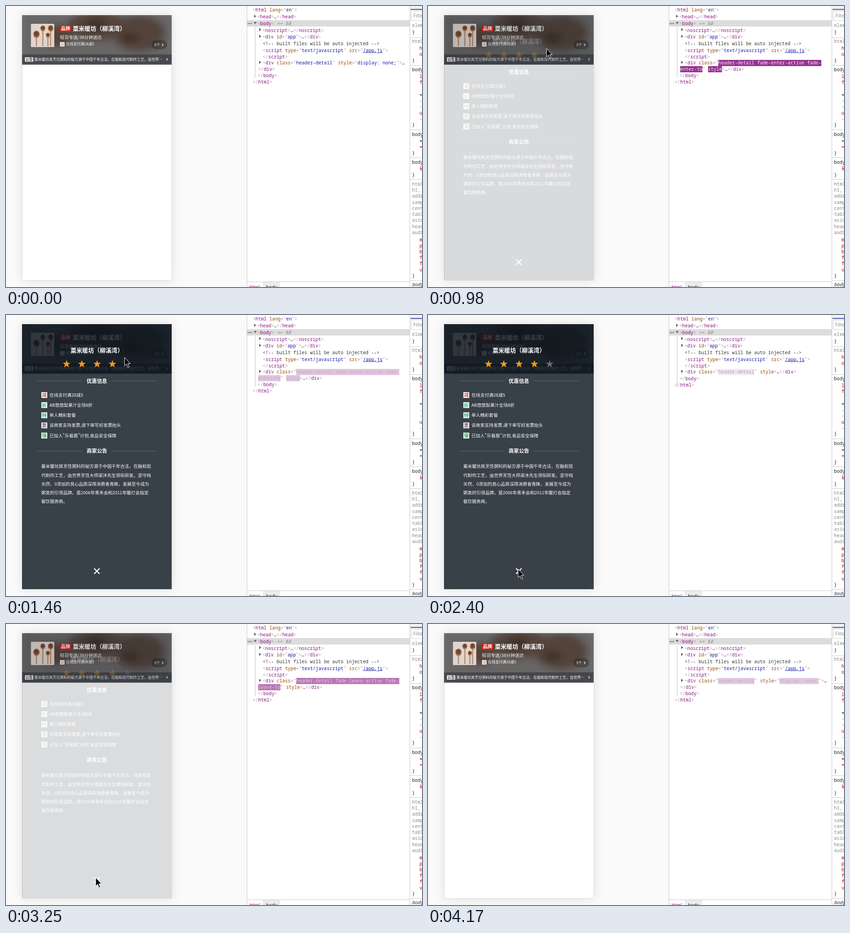
An HTML page for the animation above (4.4 s loop, 909 by 616 pixels).

```html
<!DOCTYPE html>
<html lang="zh-CN">
<head>
<meta charset="utf-8">
<title>Header detail fade</title>
<style>
  html, body { margin: 0; width: 100%; height: 100%; overflow: hidden; background: #fff; }
  svg { display: block; }
  text { white-space: pre; font-family: "Noto Sans CJK SC", "Noto Sans CJK", "Noto Sans", sans-serif; }
  .app text { fill: #fff; font-weight: 500; }
  .app .b { font-weight: 700; }
  .code text { font: 10.15px "Noto Sans Mono", "DejaVu Sans Mono", monospace; }
  .ui text { font: 10.5px "Open Sans", "Noto Sans", sans-serif; }
  .p { fill: #a894a6; }
  .n { fill: #881280; }
  .a { fill: #994500; }
  .v { fill: #1a1aa6; }
  .l { fill: #1a1aa6; text-decoration: underline; }
  .c { fill: #303a30; }
  .g { fill: #888; }
  .r { fill: #c80000; }
  .k { fill: #222; }
  .i { fill: #888; font-style: italic !important; }
  .o { fill: #222; font-style: italic !important; }
  rect.h { fill: var(--bg); }
  text.h { fill: var(--fg); }
</style>
</head>
<body>
<svg width="909" height="616" viewBox="0 0 909 616">
  <defs>
    <filter id="soft" x="-10%" y="-30%" width="120%" height="160%"><feGaussianBlur stdDeviation="8"/></filter>
    <filter id="glow" x="-20%" y="-20%" width="140%" height="140%"><feGaussianBlur stdDeviation="12"/></filter>
    <clipPath id="head"><rect x="35" y="20" width="327" height="108.500"/></clipPath>
  </defs>

  <rect width="526" height="616" fill="#fafafa"/>
  <rect x="35" y="20" width="328" height="582" fill="#000" opacity=".1" filter="url(#glow)"/>
  <rect x="35.500" y="20.500" width="327" height="581" fill="#fff" stroke="#dcdcdc"/>

  <g class="app">
    <g clip-path="url(#head)">
      <rect x="35" y="20" width="327" height="109" fill="#fff"/>
      <g filter="url(#soft)">
        <rect x="30" y="15" width="337" height="119" fill="#cbbcb2"/>
        <g fill="#a1775c">
          <ellipse cx="110" cy="66" rx="34" ry="24"/>
          <ellipse cx="200" cy="44" rx="66" ry="32"/>
          <ellipse cx="290" cy="60" rx="58" ry="40"/>
        </g>
        <g fill="#7c5238">
          <ellipse cx="196" cy="42" rx="24" ry="14"/>
          <ellipse cx="272" cy="70" rx="20" ry="12"/>
        </g>
      </g>
      <rect x="35" y="20" width="327" height="109" fill="#07111b" opacity=".5"/>
      <rect x="35" y="106" width="327" height="23" fill="#07111b" opacity=".35"/>
    </g>
    <g transform="translate(54.500 39)">
      <rect width="51" height="51" rx="1.600" fill="#dfd5ce"/>
      <g id="spoons"></g>
    </g>
    <rect x="118" y="42" width="24" height="15" rx="1.500" fill="#cf2318"/>
    <rect x="118" y="79" width="10" height="10" rx="1" fill="#f3eeec"/>
    <rect x="318" y="75" width="34" height="20" rx="10" fill="#000" opacity=".25"/>
    <rect x="41.500" y="112.500" width="18" height="9.500" rx="1" fill="#fff"/>
    <g fill="none" stroke="#fff" stroke-width="1.100">
      <path d="M341 82.500l2.500 2.500-2.500 2.500M350.500 114.500l2.500 2.500-2.500 2.500"/>
    </g>
    <g id="header"></g>

    <g id="detail" opacity="0">
      <rect x="35" y="20" width="327" height="581" fill="#07111b" opacity=".8"/>
      <path d="M68 144.500H167M230 144.500H330M68 298.500H167M230 298.500H330" stroke="#fff" stroke-opacity=".2"/>
      <g id="stars"></g>
      <g id="info"></g>
      <path d="M192.500 555.500l12 12m0-12l-12 12" stroke="#fff" stroke-width="2.400"/>
    </g>
  </g>

  <g class="code">
    <rect x="526" width="383" height="616" fill="#fff"/>
    <rect x="526" y="31" width="356" height="14" fill="#dcdcdc"/>
    <path d="M544.500 46V158" stroke="#b9c3e6"/>
    <g id="tree"></g>
    <g id="live"></g>
    <g fill="#6e6e6e">
      <path d="M542 19l5 3.500-5 3.500zM541 35h7l-3.500 5zM553 48l5 3.500-5 3.500zM553 63l5 3.500-5 3.500zM553 120l5 3.500-5 3.500z"/>
      <circle cx="529.500" cy="38.500" r="1.300"/><circle cx="533" cy="38.500" r="1.300"/><circle cx="536.500" cy="38.500" r="1.300"/>
    </g>
    <g id="styles"></g>
  </g>

  <g class="ui">
    <rect x="526" y="604" width="356" height="12" fill="#fff"/>
    <rect x="561" y="605" width="38" height="11" fill="#ececec"/>
    <path d="M526 604.500H882" stroke="#ccc"/>
    <text class="n" x="532" y="620">html</text>
    <text class="k" x="568" y="620">body</text>
    <rect x="883" width="26" height="33" fill="#f3f3f3"/>
    <rect x="884" y="6.500" width="25" height="2" fill="#3f51b5"/>
    <path d="M909 11.500H886.500V31.500H909" fill="#fff" stroke="#ddd"/>
    <text class="g" x="890" y="25">Filter</text>
    <path d="M526.500 0V616M882.500 0V616" stroke="#c8c8c8"/>
  </g>

  <path id="cursor" d="M0 0V18.500L4.200 14.600 7.200 22 10 20.700 7 13.600H12.500Z" stroke="#fff" stroke-width="1"/>
</svg>

<script>
const LOOP = 4400, STEP = 78.1, FIRST = 120;
const CW = 6.09;                               // code character width
const $ = id => document.getElementById(id);
const esc = s => s.replace(/&/g, '&amp;').replace(/</g, '&lt;');

const label = (x, y, size, str, extra = '') =>
  `<text x="${x}" y="${y}" font-size="${size}" ${extra}>${esc(str)}</text>`;

// Runs are split by "~"; the first letter of each run is its class.
function line(x, y, src) {
  let out = '', col = 0;
  for (const run of src.split('~')) {
    const cls = run[0], str = run.slice(1), px = x + col * CW;
    if (cls === 'h') out += `<rect class="h" x="${px}" y="${y - 10}" width="${str.length * CW}" height="13.500"/>`;
    out += `<text class="${cls}" x="${px}" y="${y}">${esc(str)}</text>`;
    col += str.length;
  }
  return out;
}

// Phone page
const SHOP = '粟米暖坊（柳溪湾）';
const NOTICE = [
  '粟米暖坊其烹饪粥料的秘方源于中国千年古法，在融和现',
  '代制作工艺，由世界烹饪大师梁沐先生领衔研发。坚守纯',
  '天然、0添加的良心品质深得消费者青睐，发展至今成为',
  '粥类的引领品牌。是2006年青禾会和2011年暖灯会指定',
  '餐饮服务商。'
];
const OFFERS = [
  ['减', '#c4574a', '在线支付满28减5'],
  ['折', '#35a886', 'AB悠悠梨果汁全场8折'],
  ['特', '#27ae60', '单人精彩套餐'],
  ['票', '#6d5578', '该商家支持发票,请下单写好发票抬头'],
  ['保', '#1fae4c', '已加入"乐餐盾"计划,食品安全保障']
];

$('spoons').innerHTML = [[12, 23, 7], [26, 10, 5.5], [43, 10, 6], [37, 25, 4.5]].map(([x, y, r]) =>
  `<rect x="${x - 1.3}" y="${y}" width="2.600" height="${49 - y}" fill="#b98d6c"/>
   <ellipse cx="${x}" cy="${y}" rx="${r}" ry="${r * 1.15}" fill="#a9754f"/>
   <ellipse cx="${x}" cy="${y - 1}" rx="${r * .75}" ry="${r * .8}" fill="#6f4630"/>`).join('');

$('header').innerHTML =
  label(120, 53.2, 10, '品牌', 'class="b"') +
  label(146, 54.2, 12.8, SHOP, 'class="b"') +
  label(118, 71.6, 9.6, '轻羽专送/38分钟送达') +
  label(119, 87, 8, '减', 'style="fill:#c98a80"') +
  label(131, 86, 8, OFFERS[0][2]) +
  label(324, 88, 8, '5个') +
  label(42.7, 120.2, 7.8, '公告', 'class="b" style="fill:#333"') +
  label(62, 120, 8, NOTICE[0] + NOTICE[1].slice(0, 9) + '…');

function star(cx, cy, r) {
  const pts = Array.from({ length: 10 }, (_, i) => {
    const a = i * Math.PI / 5, q = i % 2 ? r * .42 : r;
    return (cx + q * Math.sin(a)).toFixed(1) + ',' + (cy - q * Math.cos(a)).toFixed(1);
  });
  return `<polygon points="${pts.join(' ')}"/>`;
}
$('stars').innerHTML =
  `<g fill="#ff9a0c">${[0, 1, 2, 3].map(i => star(132.3 + 33.4 * i, 107.7, 8.6)).join('')}</g>
   <g id="last" fill="#666d73">${star(265.9, 107.7, 8.6)}</g>`;

$('info').innerHTML =
  label(141, 81.6, 12.8, SHOP, 'class="b"') +
  label(176.3, 148.6, 11.2, '优惠信息', 'class="b"') +
  label(176.3, 302.4, 11.2, '商家公告', 'class="b"') +
  OFFERS.map(([mark, color, str], i) => {
    const y = 175.4 + 22.2 * i;
    return `<rect x="77.300" y="${y - 6.4}" width="12.800" height="12.800" fill="#fff"/>` +
      label(78.5, y + 3.9, 10.4, mark, `class="b" style="fill:${color}"`) +
      label(95, y + 3.4, 9.6, str);
  }).join('') +
  NOTICE.map((str, i) => label(77, 335.4 + 19.2 * i, 9.6, str)).join('');

// Element tree
$('tree').innerHTML =
  line(539, 12.3, 'p<~nhtml~p ~alang~p="~ven~p">') +
  line(549, 26.5, 'p<~nhead~p>~k…~p</~nhead~p>') +
  line(549.5, 41.5, 'p<~nbody~p>~i == $0') +
  line(560.5, 56.5, 'p<~nnoscript~p>~k…~p</~nnoscript~p>') +
  line(560.5, 71, 'p<~ndiv~p ~aid~p="~vapp~p">~k…~p</~ndiv~p>') +
  line(561, 86, 'c<!-- built files will be auto injected -->') +
  line(561, 100.5, 'p<~nscript~p ~atype~p="~vtext/javascript~p" ~asrc~p="~l/app.js~p">') +
  line(561, 114.5, 'p</~nscript~p>');

const OPEN = 'p<~ndiv~p ~aclass~p="~', END = 'p>~k…~p</~ndiv~p>';
const TREES = {
  hidden: [OPEN + 'hheader-detail~p" ~astyle~p="~hdisplay: none;~p">~k…', 'p</~ndiv~p>'],
  enter: [OPEN + 'hheader-detail fade-enter-active fade-', 'henter-to~p" ~hstyle~' + END],
  shown: [OPEN + 'hheader-detail~p" ~astyle~' + END],
  leave: [OPEN + 'hheader-detail fade-leave-active fade-', 'hleave-to~p" ~astyle~' + END]
};

function tree(name, lit) {
  const [first, second] = TREES[name].map(s => lit ? s : s.replace(/~h/g, '~v'));
  const y = second ? 155.8 : 142.8;
  return line(561, 128.2, first) + (second ? line(551, 141.8, second) : '') +
    line(550, y, 'p</~nbody~p>') + line(539, y + 14.6, 'p</~nhtml~p>');
}

// Styles column: class, first y, row height, rows
const BLOCKS = [
  ['g', 42, 14, 'element'], ['k', 57, 14, '}'], ['g', 77, 14, 'html'], ['r', 92, 13.5, ' h, o'],
  ['k', 119, 14, '}'], ['k', 139, 14, 'body'], ['r', 154, 13.3, ' l, f'], ['k', 194, 13, ' -'],
  ['g', 207, 13, ' -, -'], ['r', 234, 13, ' u'], ['g', 247, 13, ' -'], ['k', 260, 14, '}'],
  ['k', 281, 14, 'body'], ['k', 295, 13, ' -'], ['r', 308, 13, ' -'], ['k', 322, 14, '}'],
  ['k', 342, 14, 'body'], ['r', 356, 14, ' l'], ['k', 370, 14, '}'],
  ['g', 390, 13.3, 'html,h1;,addr,samp,cent,tabl,asid,head,audi'],
  ['r', 512, 13.2, ' m, p, b, f, f, v'], ['k', 591, 14, '}'], ['o', 610, 14, 'body']
];
$('styles').innerHTML = BLOCKS.map(([cls, y, dy, rows]) => rows.split(',').map((s, i) =>
  line(s[0] === ' ' ? 903.5 : 887.3, y + dy * i + 3.6, cls + s.trim().replace(';', ','))).join('')).join('') +
  '<path d="M883 69.500H909M883 130.500H909M883 271.500H909M883 332.500H909M883 380.500H909M883 601.500H909" stroke="#ccc"/>' +
  '<path d="M904 194.500h5M904 295.500h5" stroke="#222"/><path d="M904 308.500h5M904 356.500h5" stroke="#c80000"/>';

// Motion
function ease(t) {   // cubic-bezier(.25, .1, .25, 1)
  if (t <= 0) return 0;
  if (t >= 1) return 1;
  const bez = (u, a, b) => 3 * u * (1 - u) ** 2 * a + 3 * u * u * (1 - u) * b + u ** 3;
  let lo = 0, hi = 1;
  for (let i = 0; i < 20; i++) {
    const u = (lo + hi) / 2;
    if (bez(u, .25, .25) < t) lo = u; else hi = u;
  }
  return bez(lo, .1, 1);
}
const mix = (a, b, p) => `rgb(${a.map((v, i) => Math.round(v + (b[i] - v) * p))})`;
const flash = (t, start) => ease((t - start) / 1400);

const PATH = [
  [120, 417, 584], [276, 372, 420], [432, 300, 200], [588, 260, 95], [666, 259, 93],
  [1600, 259, 93], [1682, 249, 156], [1916, 222, 380], [2150, 199, 545], [2228, 211, 571],
  [2380, 197, 557], [2620, 197, 557], [2700, 196, 556], [3290, 196, 556], [3400, 204, 594], [3560, 212, 640]
];
function pointer(t) {
  const i = PATH.findIndex(p => p[0] > t);
  if (i < 1) return PATH[i < 0 ? PATH.length - 1 : 0].slice(1);
  const [t0, x0, y0] = PATH[i - 1], [t1, x1, y1] = PATH[i], k = (t - t0) / (t1 - t0);
  return [x0 + (x1 - x0) * k, y0 + (y1 - y0) * k];
}

function inspect(t) {   // [tree, highlight progress]
  if (t < 820) return ['hidden', 1];
  if (t < 1530) return ['enter', flash(t, 820)];
  if (t < 2930) return ['shown', t < 2700 ? flash(Math.min(t, 1690), 820) : 1];
  if (t < 3485) return ['leave', flash(t, 2890)];
  return ['hidden', flash(t, 3450)];
}

let shownKey = '';
function draw(ms) {
  const t = FIRST + STEP * Math.floor((ms - FIRST) / STEP + 1e-6);
  const fade = t < 2985 ? ease((t - 903) / 500) : 1 - ease((t - 2985) / 500);
  $('detail').setAttribute('opacity', fade.toFixed(3));
  $('last').setAttribute('opacity', t < 1600 ? 0 : 1);

  const [x, y] = pointer(t), cursor = $('cursor');
  cursor.setAttribute('transform', `translate(${x.toFixed(1)} ${y.toFixed(1)})`);
  cursor.setAttribute('visibility', t < FIRST - 1 ? 'hidden' : 'visible');

  const [name, p] = inspect(t), live = $('live'), key = name + (p < 1);
  if (key !== shownKey) {
    live.innerHTML = tree(name, p < 1);
    shownKey = key;
  }
  live.style.setProperty('--bg', mix([136, 18, 128], [255, 255, 255], p));
  live.style.setProperty('--fg', mix([255, 255, 255], [168, 148, 166], p));
}

let start;
function tick(now) {
  if (start === undefined) start = now;
  draw((now - start) % LOOP);
  requestAnimationFrame(tick);
}
draw(0);
requestAnimationFrame(tick);
</script>
</body>
</html>
```
